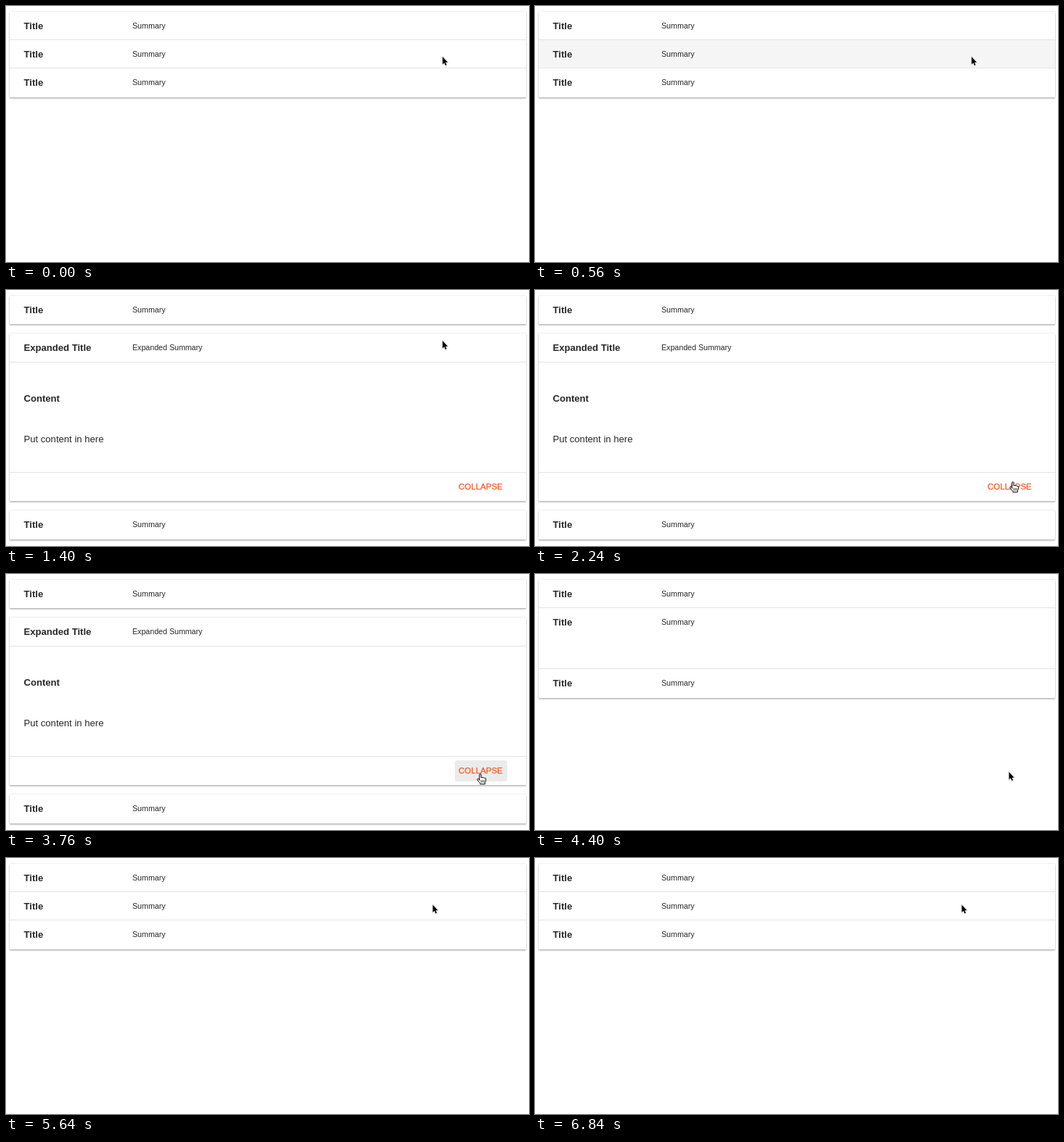
Animation, 720 px wide and 353 px high, one loop 8760 ms. Source, as an HTML page:

```html
<!DOCTYPE html>
<html lang="en">
<head>
<meta charset="utf-8">
<title>Expansion panels</title>
<style>
html, body { margin: 0; width: 100%; height: 100%; overflow: hidden; background: #fff; }
#stage {
  position: relative; width: 720px; height: 353px; overflow: hidden; isolation: isolate;
  font-family: "Liberation Sans", Arial, sans-serif; color: #262626; white-space: nowrap;
}
#stage div, #stage b, #stage span, svg { position: absolute; }
.card { left: 5px; width: 711px; height: 39px; background: #fff; border-radius: 1px; }
.card::before {
  content: ""; position: absolute; inset: 0; z-index: -1; border-radius: 1px;
  box-shadow: 0 1.5px 2px rgba(0,0,0,.28), 0 0 1.5px rgba(0,0,0,.28);
}
.clip { inset: 0; overflow: hidden; }
.full { left: 0; width: 100%; height: 231px; }
.line { left: 0; width: 100%; height: 1px; background: #e4e4e4; }
.divider { bottom: 0; }
b, span { line-height: 16px; }
b { left: 19.5px; top: 12px; font-size: 13.1px; }
span { left: 169px; top: 11px; font-size: 10.65px; }
#hover { left: 0; width: 100%; height: 39px; background: #f5f5f5; }
#focus { left: 613px; top: 197px; width: 72px; height: 29px; border-radius: 2px; background: #ebebeb; }
#stage #action { left: 618px; top: 203px; font-size: 11.5px; color: #f4602f; -webkit-text-stroke: .35px #f4602f; }
#stage #text { left: 19.5px; top: 138px; font-size: 13.1px; }
#last { height: 40px; }
svg { left: 0; top: 0; overflow: visible; filter: drop-shadow(0 .7px .6px rgba(0,0,0,.35)); }
</style>
</head>
<body>
<div id="stage">
  <div class="card" style="top:8px"><b>Title</b><span>Summary</span><div class="line divider"></div></div>
  <div class="card" id="panel">
    <div class="clip">
      <div id="hover"></div>
      <div id="closed" class="full"><b>Title</b><span>Summary</span></div>
      <div id="open" class="full">
        <b>Expanded Title</b><span>Expanded Summary</span>
        <div class="line" style="top:39px"></div>
        <b style="top:82px">Content</b>
        <span id="text">Put content in here</span>
        <div class="line" style="top:191px"></div>
        <div id="focus"></div><span id="action">COLLAPSE</span>
      </div>
    </div>
    <div class="line divider"></div>
  </div>
  <div class="card" id="last"><b>Title</b><span>Summary</span></div>
  <svg id="cursor" width="16" height="18">
    <path id="arrow" transform="scale(.9)" d="M0 0V11.6L2.6 9.2L4.3 13.2L6.2 12.4L4.5 8.5H8Z" stroke="#fff" stroke-width="1.4" paint-order="stroke"/>
    <g id="hand" stroke="#111" stroke-linejoin="round" stroke-linecap="round">
      <path fill="#fff" d="M-1.2 8.6V1.3Q-1.2 .2 -.1 .2Q1 .2 1 1.3V5.2Q2 4.3 3.2 5.4Q4.4 4.7 5.4 5.9Q7.7 5.3 7.7 7.6Q7.7 10.6 6.4 12V14.2H-.2V13Q-2 11.4 -4.2 8Q-4.3 6.6 -2.9 6.8Z"/>
      <path fill="none" stroke-width=".8" d="M1.2 9V11.8M3.2 9V11.8M5.2 9V11.8"/>
    </g>
  </svg>
</div>
<script>
const LOOP = 8760, ROW = 39, BODY = 192, GAP = 13;
const OPEN_AT = 654, CLOSE_AT = 4265.5, SLIDE = 160, SPREAD = 120, FADE = 150;
const $ = id => document.getElementById(id);
const ramp = (t, start, length) => Math.min(1, Math.max(0, (t - start) / length));
const smooth = k => k * k * (3 - 2 * k);

// [time, x, y] of the pointer tip
const path = [
  [0, 601, 70], [1400, 601, 70], [2240, 658, 264.5], [2880, 653, 275.5],
  [4320, 653, 275.5], [4400, 652.5, 273], [4800, 599.5, 117.5],
  [5200, 588, 58], [5640, 587.5, 64.5], [LOOP, 587.5, 64.5]
];

function pointer(t) {
  const i = path.findIndex(p => p[0] > t);
  const [t0, x0, y0] = path[i - 1], [t1, x1, y1] = path[i];
  const k = smooth((t - t0) / (t1 - t0));
  return [x0 + (x1 - x0) * k, y0 + (y1 - y0) * k];
}

function draw(t) {
  const closing = t >= CLOSE_AT, opened = t >= OPEN_AT && !closing;
  const start = closing ? CLOSE_AT : OPEN_AT;
  const spread = ramp(t, start, SPREAD);
  const eased = ramp(t, start, SLIDE) ** 1.6;
  const gap = GAP * (closing ? 1 - spread : spread);
  const height = ROW + BODY * (closing ? 1 - eased : eased);
  const top = 8 + ROW + gap;

  $("panel").style.top = top + "px";
  $("panel").style.height = height + "px";
  $("last").style.top = top + height + gap + "px";
  document.querySelectorAll(".divider").forEach(d => d.style.opacity = 1 - gap / GAP);
  $("closed").style.opacity = opened ? 0 : 1;
  $("open").style.opacity = opened ? ramp(t, OPEN_AT, FADE) : 0;
  $("hover").style.opacity = t >= 320 && t < OPEN_AT ? 1 : 0;
  $("focus").style.opacity = ramp(t, 3460, 160);

  const [x, y] = pointer(t);
  const onButton = opened && y > 257;
  $("cursor").style.transform = `translate(${x}px, ${y}px)`;
  $("arrow").style.display = onButton ? "none" : "";
  $("hand").style.display = onButton ? "" : "none";
}

function tick() {
  draw(performance.now() % LOOP);
  requestAnimationFrame(tick);
}
tick();
</script>
</body>
</html>
```
